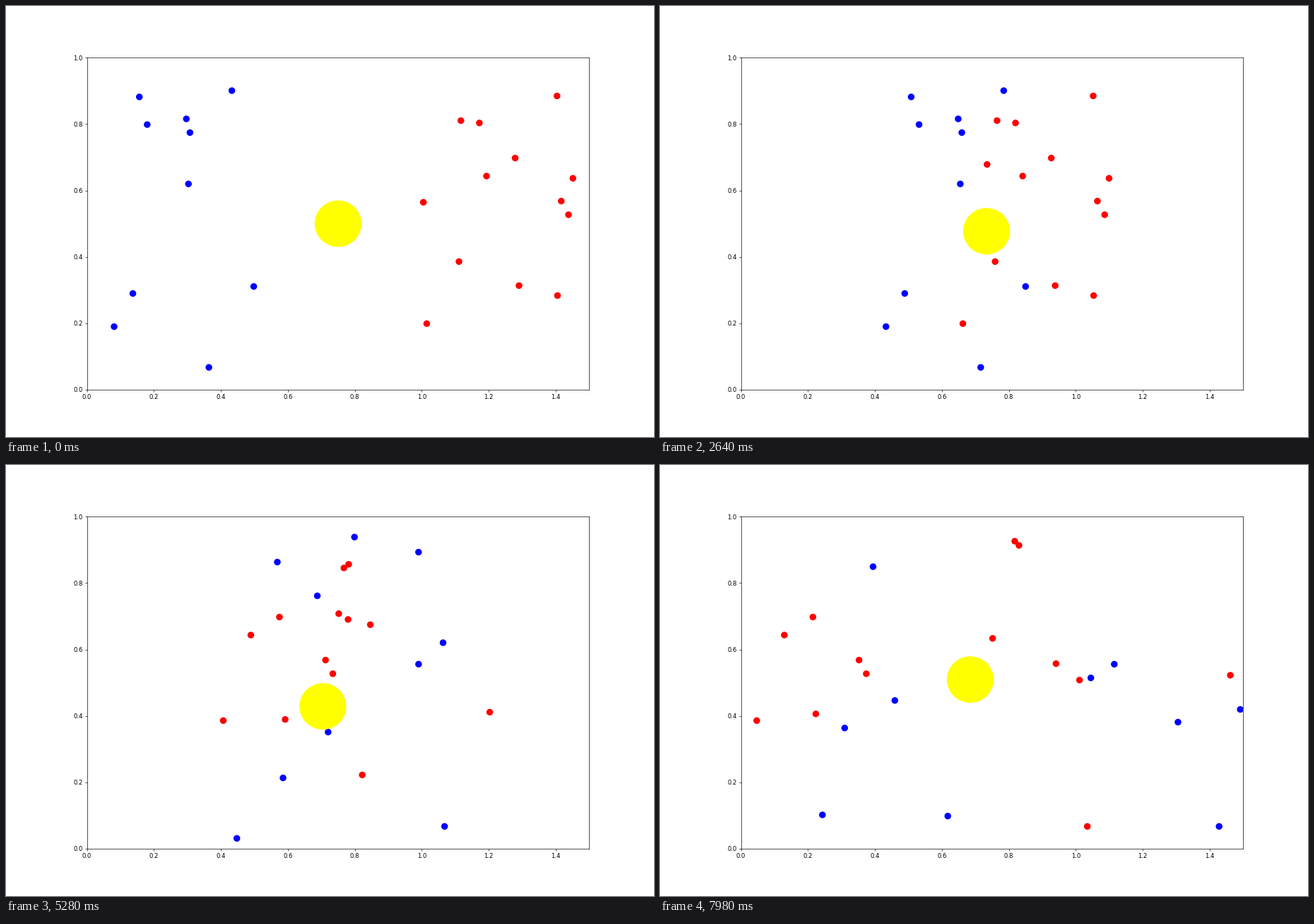
These frames come from a looping animation (917 px wide and 611 px high, 8 s). A matplotlib script:

```python
import numpy as np
import matplotlib.pyplot as plt
from matplotlib.animation import FuncAnimation

W, H, DPI = 917, 611, 64
LOOP, FRAMES = 8000, 267
SCALE = W / 15 / DPI          # keeps the look of a 15 inch wide figure

SPEED = 0.004                 # axes units per frame
BOX = np.array([1.5, 1.0])
BALL_R, SUN_R, SUN_MASS = 0.01, 0.07, 5

# Starting places in thousandths of an axes unit.
BLUE = [
    (156.315, 881.9), (179.772, 798.556), (296.715, 815.7), (307.515, 774.4),
    (302.96, 619.735), (432.7, 900.8), (498, 310.7), (137, 289.6),
    (81, 189.7), (364, 66.9),
]
RED = [
    (1116.765, 810.5), (1171.9, 803.46), (1403.85, 884.8), (1278.8, 697.7),
    (1193.3, 643.4), (1451.36, 636.735), (1416.5, 568), (1438.2, 526.9),
    (1004.6, 564.5), (1111, 385.7), (1290.4, 313.3), (1405.3, 283.35),
    (1014.7, 198.85),
]
SUN = [(750, 500)]

start = np.array(BLUE + RED + SUN) / 1000
count = len(start)
drift = np.zeros((count, 2))
drift[:len(BLUE), 0] = SPEED
drift[len(BLUE):-1, 0] = -SPEED
radius = np.append(np.full(count - 1, BALL_R), SUN_R)
mass = np.append(np.ones(count - 1), SUN_MASS)
colors = ["blue"] * len(BLUE) + ["red"] * len(RED) + ["yellow"]


def bounce(pos, vel):
    """Velocities after each ball reacts to the first one it overlaps."""
    gap = pos[:, None] - pos[None]
    touch = np.hypot(gap[..., 0], gap[..., 1]) < radius[:, None] + radius
    np.fill_diagonal(touch, False)
    new = vel.copy()
    for i in np.flatnonzero(touch.any(axis=1)):
        j = touch[i].argmax()
        d = gap[i, j]
        share = 2 * mass[j] / (mass[i] + mass[j])
        new[i] -= share * np.dot(vel[i] - vel[j], d) / np.dot(d, d) * d
    return np.where((pos < 0) | (pos > BOX), -new, new)


def simulate():
    pos, vel = start.copy(), drift.copy()
    path = [pos]
    for _ in range(FRAMES - 1):
        pos = pos + vel
        vel = bounce(pos, vel)
        path.append(pos)
    return path


path = simulate()

plt.rcParams.update({
    "font.family": "DejaVu Sans",
    "font.size": 10 * SCALE,
    "axes.linewidth": 0.8 * SCALE,
})
for axis in ("xtick", "ytick"):
    plt.rcParams[f"{axis}.major.size"] = 3.5 * SCALE
    plt.rcParams[f"{axis}.major.width"] = 0.8 * SCALE
    plt.rcParams[f"{axis}.major.pad"] = 3.5 * SCALE

fig = plt.figure(figsize=(W / DPI, H / DPI), dpi=DPI, facecolor="white")
ax = fig.add_axes([0.125, 0.11, 0.775, 0.77])
ax.set_xlim(0, BOX[0])
ax.set_ylim(0, BOX[1])

discs = [plt.Circle(p, r, color=c, linewidth=0)
         for p, r, c in zip(start, radius, colors)]
for disc in discs:
    ax.add_patch(disc)


def update(i):
    for disc, center in zip(discs, path[i]):
        disc.center = center
    return discs


anim = FuncAnimation(fig, update, frames=FRAMES, interval=LOOP / FRAMES,
                     init_func=lambda: update(0), repeat=True,
                     repeat_delay=0, blit=False)
plt.show()
```
